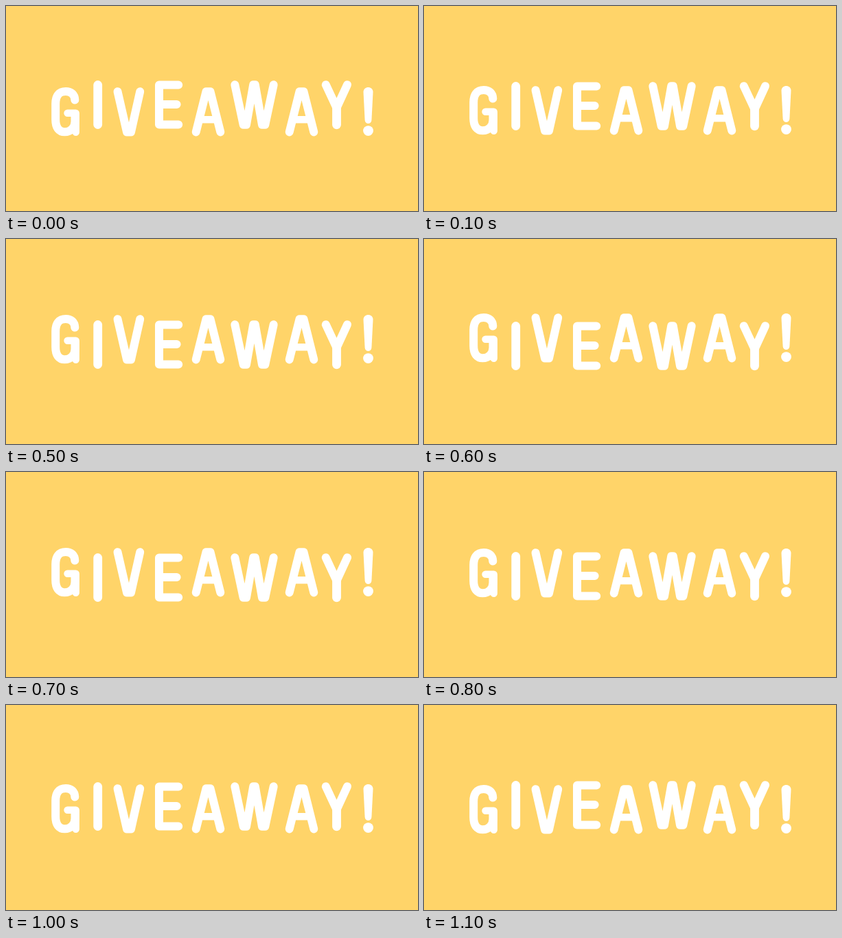
These frames come from a looping animation (600 px wide and 300 px high, 1.2 s). An HTML page:

```html
<!DOCTYPE html>
<html lang="en">
<head>
<meta charset="utf-8">
<title>Giveaway</title>
<style>
  html, body { margin: 0; width: 100%; height: 100%; overflow: hidden; background: #ffd469; }
  svg { display: block; width: 100%; height: 100%; }
  .letter { fill: none; stroke: #fff; stroke-width: 12; stroke-linecap: round; stroke-linejoin: round; }
  .stem { stroke-width: 12.8; }
  .thin { stroke-width: 10.4; }
  .solid { fill: #fff; stroke: none; }
</style>
</head>
<body>
<svg viewBox="0 0 600 300" role="img" aria-label="GIVEAWAY!">
  <defs>
    <g id="a">
      <path d="M276.7 179.4 L291.5 120.2 H297.5 L312.3 179.4"/>
      <path class="thin" d="M284 161.3 H305"/>
    </g>
  </defs>
  <g id="odd" class="letter">
    <g>
      <path d="M100.3 132.500 C100 124.5 95 120 87 120 C77 120 72.2 126.5 72.2 138 V161 C72.2 173 77 179.300 85.500 179.300 C94 179.300 100.500 173 100.500 164 V153"/>
      <path class="thin" d="M89.500 151.800 H101.700 V179.800"/>
    </g>
    <path d="M162.500 120.200 L176 179.400 H182 L195.200 120.200"/>
    <use href="#a"/>
    <use href="#a" x="136"/>
    <g class="solid">
      <path d="M520.500 121 C520.500 111.700 534.500 111.700 534.500 121 L532.400 162 C532 168.800 523 168.800 522.600 162 Z"/>
      <circle cx="527.500" cy="177.600" r="7.400"/>
    </g>
  </g>
  <g id="even" class="letter">
    <path class="stem" d="M133.700 121.500 V179.500"/>
    <path d="M251.200 121.600 H223 V179.400 H251.200 M223 150 H248.600"/>
    <path d="M333.300 121.200 L345.700 179.700 H350 L360.200 121.200 H362.800 L373 179.700 H377.300 L389.700 121.200"/>
    <path d="M465.800 121.200 L481.500 155 L497 121.200"/>
    <path class="stem" d="M481.500 156 V179.800"/>
  </g>
</svg>
<script>
  const LOOP = 1200, STEP = 100;
  const odd = document.getElementById('odd');
  const even = document.getElementById('even');

  const shift = (group, y) => group.setAttribute('transform', `translate(0 ${Math.round(y)})`);

  // Triangle wave from 1 to -1 and back, held for each step.
  function draw(time) {
    const held = Math.floor((time % LOOP) / STEP) * STEP;
    const wave = Math.abs(held / (LOOP / 2) - 1) * 2 - 1;
    shift(odd, 5 * wave);
    shift(even, -6 * wave);
  }

  const start = performance.now();
  function tick() {
    draw(performance.now() - start);
    requestAnimationFrame(tick);
  }
  tick();
</script>
</body>
</html>
```
